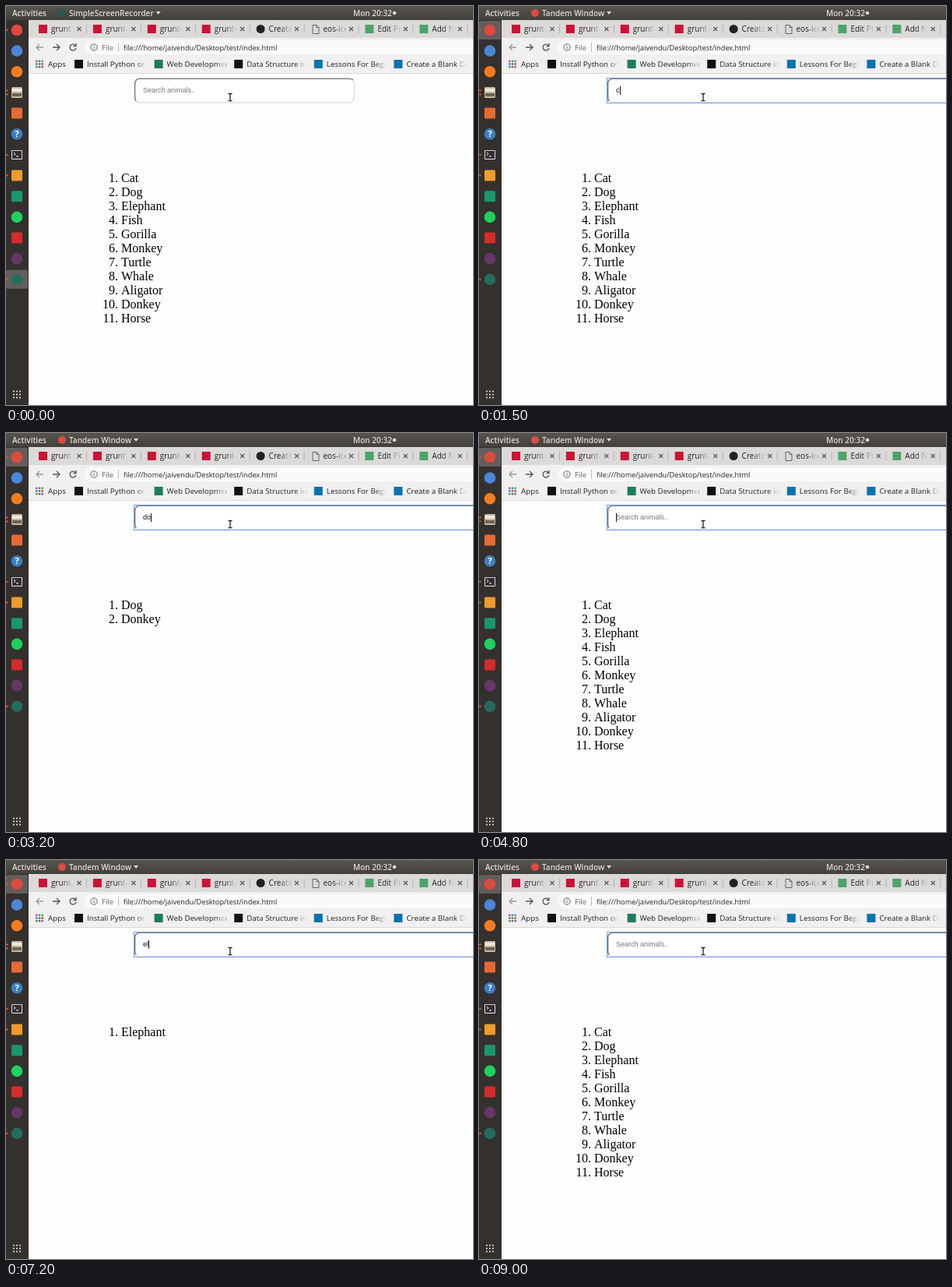
These frames come from a looping animation (600 by 512 pixels, 9.1 s). An HTML page with a canvas:

```html
<!DOCTYPE html>
<html lang="en">
<head>
<meta charset="utf-8">
<title>Animal search</title>
<style>
html, body { margin: 0; width: 600px; height: 512px; overflow: hidden; }
canvas { display: block; }
</style>
</head>
<body>
<canvas id="stage" width="600" height="512"></canvas>
<script>
const ctx = document.getElementById('stage').getContext('2d');
const LOOP = 9100, FOCUS = 400, BLINK = 500, GROW = 400;
const UI = '"Open Sans", "Noto Sans", sans-serif';
const SANS = '"Liberation Sans", Arial, sans-serif';
const SERIF = '"Liberation Serif", "Times New Roman", serif';
const STRIP = '#dcd9d9', BAR = '#f1efef';

const animals = ['Cat', 'Dog', 'Elephant', 'Fish', 'Gorilla', 'Monkey',
  'Turtle', 'Whale', 'Aligator', 'Donkey', 'Horse'];

// [time, value]: the field changes on key down, the list on key up
const typed = [[0, ''], [1400, 'c'], [2000, ''], [2600, 'd'], [2800, 'do'], [4500, 'd'],
  [4700, ''], [5500, 'e'], [5900, ''], [6700, 'e'], [7000, 'el'], [7800, 'e'], [8100, '']];
const filters = [[0, ''], [1600, 'c'], [2200, ''], [2700, 'd'], [4700, ''], [5700, 'e'],
  [6500, ''], [6800, 'e'], [7100, 'el'], [7900, 'e'], [8300, '']];
const latest = (steps, t) => steps.filter(s => s[0] <= t).pop();

function rect(x, y, w, h, fill, r = 0) {
  ctx.fillStyle = fill;
  ctx.beginPath();
  ctx.roundRect(x, y, w, h, r);
  ctx.fill();
}
function disc(x, y, r, fill) {
  ctx.fillStyle = fill;
  ctx.beginPath();
  ctx.arc(x, y, r, 0, 7);
  ctx.fill();
}
function stroke(d, color, width = 1) {
  ctx.strokeStyle = color;
  ctx.lineWidth = width;
  ctx.stroke(new Path2D(d));
}
function fill(d, color) {
  ctx.fillStyle = color;
  ctx.fill(new Path2D(d));
}
function text(s, x, y, font, color, align = 'left') {
  ctx.font = font;
  ctx.fillStyle = color;
  ctx.textAlign = align;
  ctx.fillText(s, x, y);
  return ctx.measureText(s).width;
}
function vertical(y0, y1, from, to) {
  const g = ctx.createLinearGradient(0, y0, 0, y1);
  g.addColorStop(0, from);
  g.addColorStop(1, to);
  return g;
}
// Label cut off at the right with a soft fade
function label(s, x, y, width, size, bg) {
  ctx.save();
  ctx.beginPath();
  ctx.rect(x, y - 12, width, 18);
  ctx.clip();
  text(s, x, y, `${size}px ${UI}`, '#222');
  const g = ctx.createLinearGradient(x + width - 14, 0, x + width, 0);
  g.addColorStop(0, bg + '00');
  g.addColorStop(1, bg);
  ctx.fillStyle = g;
  ctx.fillRect(x + width - 14, y - 12, 14, 18);
  ctx.restore();
}
function dots(x, y, step, r, color) {
  for (let i = 0; i < 9; i++)
    disc(x + (i % 3 - 1) * step, y + (Math.floor(i / 3) - 1) * step, r, color(i));
}

function topBar(focused) {
  rect(0, 0, 600, 18, vertical(0, 18, '#57544e', '#42403b'));
  const font = `600 10px ${UI}`, color = '#e0dcd4';
  text('Activities', 8, 13, font, color);
  disc(72, 9, 5, focused ? '#dd4b3e' : '#245a52');
  const app = focused ? 'Tandem Window' : 'SimpleScreenRecorder';
  const end = 81 + text(app, 81, 13, font, color);
  fill(`M${end + 3} 7h6l-3 4z`, color);
  text('Mon 20:32', 446, 13, font, color);
  disc(499, 9, 2.3, color);
}

function dock(focused) {
  rect(0, 18, 29, 494, '#34302d');
  const row = i => 31 + i * 26.65;
  rect(0, row(focused ? 0 : 12) - 12, 28, 24, '#625e5b', 2);
  const round = (i, color) => disc(14, row(i), 7.3, color);
  const square = (i, color) => rect(7, row(i) - 7, 14, 14, color, 1.5);
  round(0, '#dd4b3e');
  round(1, '#4a87d8');
  round(2, '#f57b20');
  rect(7, row(3) - 7, 14, 14, '#c9b89c', 1.5);
  rect(8, row(3) - 5, 12, 4, '#eee9df');
  rect(8, row(3) + 1, 12, 4, '#6e6255');
  square(4, '#e66a35');
  round(5, '#3b7fc4');
  text('?', 14, row(5) + 4, `bold 11px ${UI}`, '#fff', 'center');
  rect(7, row(6) - 6, 14, 12, '#ddd', 1);
  rect(8, row(6) - 5, 12, 10, '#342d33');
  stroke(`M10 ${row(6) - 3}l2 2l-2 2m3 1h3`, '#fff');
  square(7, '#ef9b2d');
  square(8, '#19976f');
  round(9, '#1ed25f');
  square(10, '#d52b2b');
  round(11, '#673668');
  round(12, '#246c60');
  for (const i of [0, 6, 7, 12]) disc(1.5, row(i), 1.2, '#e95420');
  for (const dy of [-2.5, 2.5]) disc(1.5, row(3) + dy, 1.2, '#e95420');
  dots(14, 498.5, 4, 1.1, () => '#e4e1de');
}

function tabs() {
  rect(29, 18, 571, 24, STRIP);
  ['grunt-c', 'grunt-c', 'grunt-c', 'grunt-c', 'Create', 'eos-ico', 'Edit Po', 'Add Ne'].forEach((name, i) => {
    const x = 42 + i * 69.9;
    if (i < 4) rect(x, 24, 11, 11, '#cb1237');
    else if (i === 4) disc(x + 5.5, 29.5, 5.5, '#222');
    else if (i === 5) {
      stroke(`M${x + 2.5} 24.5h5l3 3v8h-8zM${x + 7.5} 24.5v3h3`, '#666');
    } else rect(x, 24, 11, 11, '#4ba56b');
    label(name, x + 16, 33, 28, 10, STRIP);
    stroke(`M${x + 49.5} 27l5 5m0 -5l-5 5`, '#555', 1.1);
    stroke(`M${x + 61.5} 24v11`, '#b3b0b0');
  });
}

function toolbar() {
  rect(29, 41, 571, 46, BAR);
  stroke('M48 53h-9m4 -4l-4 4l4 4', '#999', 1.3);
  stroke('M60 53h9m-4 -4l4 4l-4 4', '#555', 1.3);
  stroke('M89.3 50.6A4 4 0 1 0 90 54M90 48v3.5h-3.5', '#555', 1.3);
  rect(101, 44, 520, 18, '#fbfafa', 9);
  ctx.strokeStyle = '#666';
  ctx.lineWidth = 1;
  ctx.beginPath();
  ctx.arc(113, 53, 4.2, 0, 7);
  ctx.stroke();
  stroke('M113 52.3v3m0 -4.8v1', '#666');
  text('File', 123, 56.5, `9.5px ${UI}`, '#666');
  stroke('M144.5 47v12', '#bbb');
  text('file:///home/jaivendu/Desktop/test/index.html', 151, 56.5, `9.2px ${UI}`, '#222');

  const hues = ['#d8433b', '#3b7ded', '#3aa757'];
  dots(43, 74.5, 3.7, 1.4, i => hues[(i + Math.floor(i / 3)) % 3]);
  text('Apps', 54, 78, `9.8px ${UI}`, '#222');
  const marks = [['Install Python on', '#111'], ['Web Developmen', '#1c7c60'], ['Data Structure in', '#111'],
    ['Lessons For Begin', '#0873ac'], ['Create a Blank Do', '#0873ac']];
  marks.forEach(([name, color], i) => {
    const x = 88 + i * 102.6;
    rect(x, 69, 11, 11, color);
    label(name, x + 16, 78, 76, 9.8, BAR);
  });
  rect(29, 86, 571, 1, '#d9d7d7');
}

function searchBox(t, focused) {
  const p = Math.min(1, Math.max(0, (t - FOCUS) / GROW));
  const w = 283 + 650 * p * p * (3 - 2 * p);
  const right = 165 + w;
  rect(165.5, 93, w - 1, 31, '#fff', 7);
  ctx.strokeStyle = '#dcdce4';
  ctx.lineWidth = 1.3;
  ctx.stroke();
  stroke(`M167 122Q165.6 120 165.6 117V100Q165.6 93.4 172 93.4H${right - 7}Q${right - 3} 93.4 ${right - 2} 95`,
    focused ? '#6f7286' : '#7b7b7b', 1.4);
  if (focused) {
    ctx.strokeStyle = '#7f9fe0';
    ctx.lineWidth = 1.1;
    ctx.strokeRect(164.5, 92.5, w + 1, 32);
  }
  const [keyTime, value] = latest(typed, t);
  const font = `9px ${SANS}`;
  let end = 176;
  if (value) end += text(value, 176, 111, font, '#111');
  else text('Search animals..', 176, 111, font, '#757575');
  const since = t - Math.max(keyTime, FOCUS);
  if (focused && Math.floor(since / BLINK) % 2 === 0) rect(Math.round(end), 103, 1, 11, '#111');
}

function list(t) {
  const query = latest(filters, t)[1];
  const font = `16px ${SERIF}`;
  animals.filter(a => a.toLowerCase().includes(query)).forEach((name, i) => {
    const y = 226 + i * 18;
    text(`${i + 1}.`, 144, y, font, '#000', 'right');
    text(name, 148, y, font, '#000');
  });
}

function pointer() {
  const d = 'M285.5 112.5h1.5q1 0 1 1q0 -1 1 -1h1.5M288 113v8M285.5 121.7h1.5q1 0 1 -1q0 1 1 1h1.5';
  stroke(d, '#fff', 2.6);
  stroke(d, '#222', 1.3);
}

function draw() {
  const t = Math.floor(performance.now() % LOOP / 100) * 100;
  const focused = t >= FOCUS;
  rect(0, 0, 600, 512, '#fefefe');
  tabs();
  toolbar();
  searchBox(t, focused);
  list(t);
  pointer();
  dock(focused);
  topBar(focused);
  requestAnimationFrame(draw);
}
draw();
</script>
</body>
</html>
```
